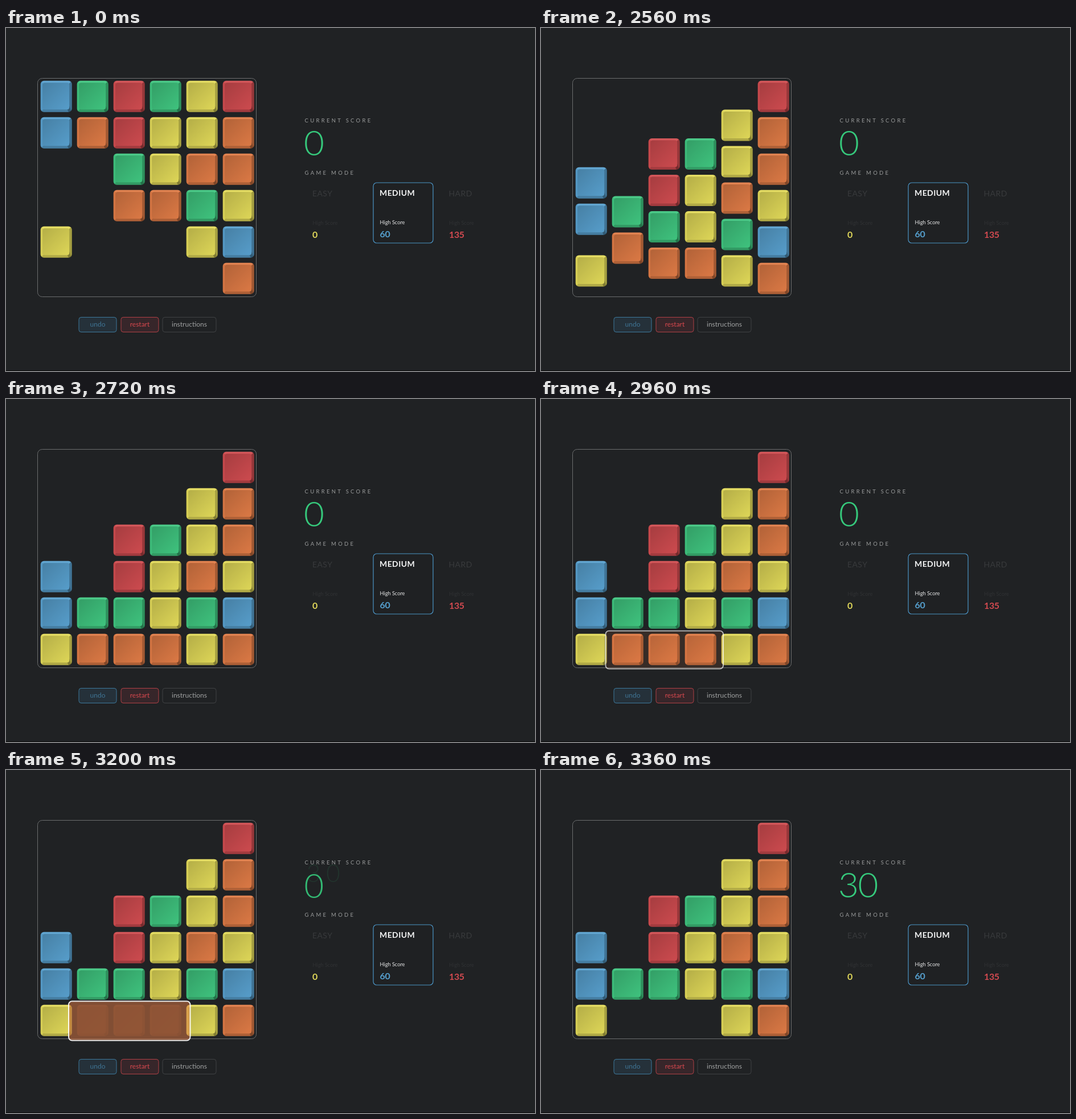
Recreate the animation shown at these times as an HTML page. Size 929 by 603 pixels, loop 4.56 s.

```html
<!DOCTYPE html>
<html lang="en">
<head>
<meta charset="utf-8">
<title>Falling blocks</title>
<style>
  html, body { margin: 0; width: 100%; height: 100%; overflow: hidden; background: #202224; }
  svg { display: block; width: 100vw; height: 100vh; }
  text { font-family: Lato, "Open Sans", sans-serif; }
  .caption { font-size: 9.5px; letter-spacing: 3.3px; fill: #9a9c9c; }
  .digit { font-size: 62px; font-weight: 300; fill: #36c97c; text-anchor: middle; }
  .mode { font-size: 14px; letter-spacing: .4px; fill: #383a3c; }
  .label { font-size: 9.2px; fill: #303234; }
  .best { font-size: 16px; font-weight: 700; letter-spacing: -.4px; }
  .active .mode { font-weight: 700; fill: #f4f5f5; }
  .active .label { fill: #e6e7e7; }
  .button { font-size: 12px; text-anchor: middle; }
</style>
</head>
<body>
<svg id="stage" viewBox="0 0 929 603" preserveAspectRatio="none">
  <defs>
    <linearGradient id="shade" x1="0" y1="0" x2="1" y2="1">
      <stop offset="0" stop-opacity=".2"/>
      <stop offset="1" stop-opacity=".02"/>
    </linearGradient>
    <g id="bevel">
      <path d="M55 6V49Q55 55 49 55L45 45V10L53 2Q55 3 55 6Z" fill-opacity=".27"/>
      <path d="M2 53L10 45H51L53.5 53Q52 55 49 55H6Q3.5 55 2 53Z" fill-opacity=".22"/>
      <path d="M2 2Q3.5 0 6 0H49Q51.5 0 53 2L45 10H10Z" fill="#fff" fill-opacity=".06"/>
      <path d="M2 2L10 10V45L2 53Q0 51.5 0 49V6Q0 3.5 2 2Z" fill-opacity=".05"/>
    </g>
  </defs>
  <rect width="929" height="603" fill="#202224"/>
  <rect y="602" width="929" height="1" fill="#0c0d0d"/>
  <rect x="55.5" y="88.5" width="384" height="384" rx="8" fill="none" stroke="#6b6d6e"/>
  <g id="tiles"></g>
  <g id="match">
    <rect x="110" y="406.5" width="213.5" height="69" rx="6" fill="#e07b45"/>
    <rect x="110" y="406.5" width="213.5" height="69" rx="6" fill="none" stroke="#fff" stroke-width="2"/>
  </g>

  <text class="caption" x="524.5" y="166">CURRENT SCORE</text>
  <g id="score"></g>
  <text class="caption" x="524.5" y="257.7">GAME MODE</text>

  <g>
    <text class="mode" x="538" y="296">EASY</text>
    <text class="label" x="538.5" y="345.5">High Score</text>
    <text class="best" x="538" y="369" fill="#e0d85a">0</text>
  </g>
  <g class="active">
    <rect x="645" y="272" width="105" height="106" rx="6" fill="#1f2123" stroke="#4b95c6" stroke-width="1.2"/>
    <text class="mode" x="656" y="295">MEDIUM</text>
    <text class="label" x="656.5" y="344.5">High Score</text>
    <text class="best" x="656.5" y="368" fill="#559fcd">60</text>
  </g>
  <g>
    <text class="mode" x="777.5" y="296">HARD</text>
    <text class="label" x="778" y="345.5">High Score</text>
    <text class="best" x="778" y="369" fill="#d24a50">135</text>
  </g>

  <rect x="128" y="508.5" width="66" height="26" rx="4" fill="#25313a" stroke="#3d799c"/>
  <text class="button" x="161" y="525" fill="#3f7595">undo</text>
  <rect x="202" y="508.5" width="66" height="26" rx="4" fill="#37262a" stroke="#b04046"/>
  <text class="button" x="235" y="525" fill="#d8484e">restart</text>
  <rect x="275" y="508.5" width="94" height="26" rx="4" fill="none" stroke="#404244"/>
  <text class="button" x="322" y="525" fill="#a0a2a2">instructions</text>
</svg>
<script>
const LOOP = 4560, STEP = 80, CELL = 64;
const COLORS = { B: '#58a0ce', G: '#40c680', R: '#d04c50', Y: '#e2da59', O: '#df7b46' };
const BOARD = ['BGRGYR', 'BORYYO', '..GYOO', '..OOGY', 'Y...YB', '.....O'];
const byId = id => document.getElementById(id);

function add(parent, name, attrs) {
  const node = document.createElementNS('http://www.w3.org/2000/svg', name);
  for (const key in attrs) node.setAttribute(key, attrs[key]);
  return parent.appendChild(node);
}

// The CSS "ease" curve, cubic-bezier(.25, .1, .25, 1), solved by bisection.
function ease(x) {
  if (x <= 0) return 0;
  if (x >= 1) return 1;
  const curve = (a, b, u) => 3 * (1 - u) ** 2 * u * a + 3 * (1 - u) * u * u * b + u ** 3;
  let low = 0, high = 1;
  for (let i = 0; i < 24; i++) {
    const mid = (low + high) / 2;
    if (curve(.25, .25, mid) < x) low = mid; else high = mid;
  }
  return curve(.1, 1, low);
}

function makeTile(color, col, row) {
  const drop = BOARD.slice(row + 1).filter(line => line[col] === '.').length;
  const node = add(byId('tiles'), 'g');
  add(node, 'rect', { width: 55, height: 55, rx: 6, fill: COLORS[color] });
  add(node, 'use', { href: '#bevel' });
  add(node, 'rect', { x: 3.5, y: 3.5, width: 47, height: 47, rx: 4, fill: COLORS[color] });
  add(node, 'rect', { x: 3.5, y: 3.5, width: 47, height: 47, rx: 4, fill: 'url(#shade)' });
  const matched = row + drop === 5 && col >= 1 && col <= 3;
  return { node, col, row, drop, matched };
}

function makeDigit(char, x) {
  const node = add(byId('score'), 'text', { class: 'digit', y: 224 });
  node.textContent = char;
  return { node, x };
}

function placeDigit({ node, x }, shift, scale, opacity) {
  node.setAttribute('x', x);
  node.setAttribute('transform',
    `translate(${x} ${201.5 + shift}) scale(${scale}) translate(${-x} -201.5)`);
  node.setAttribute('opacity', opacity);
}

const tiles = BOARD.flatMap((line, row) =>
  [...line].flatMap((color, col) => color === '.' ? [] : [makeTile(color, col, row)]));
const oldDigit = makeDigit('0', 541);
const newDigits = [makeDigit('3', 540), makeDigit('0', 574.5)];
const match = byId('match');
const [glow] = match.children;

function render(time) {
  const t = Math.floor(time / STEP) * STEP;
  const fall = ease((t - 2418) / 290);
  const select = ease((t - 2845) / 290);
  const clear = ease((t - 3050) / 290);
  const swap = t >= 3360 ? 1 : ease((t - 3180) / 200);

  for (const { node, col, row, drop, matched } of tiles) {
    const y = 92.7 + CELL * (row + drop * fall);
    node.setAttribute('transform', `translate(${60.7 + CELL * col} ${y})`);
    node.setAttribute('opacity', matched ? 1 - clear : 1);
  }

  match.setAttribute('transform',
    `translate(216.75 441) scale(${.9 + .1 * select}) translate(-216.75 -441)`);
  match.setAttribute('opacity', select * (1 - swap));
  glow.setAttribute('opacity', .18 + .46 * clear);

  placeDigit(oldDigit, 22 * swap, 1 - .35 * swap, 1 - swap);
  for (const digit of newDigits) placeDigit(digit, -22 * (1 - swap), .65 + .35 * swap, swap);
}

const start = performance.now();
function tick() {
  render((performance.now() - start) % LOOP);
  requestAnimationFrame(tick);
}
tick();
</script>
</body>
</html>
```
